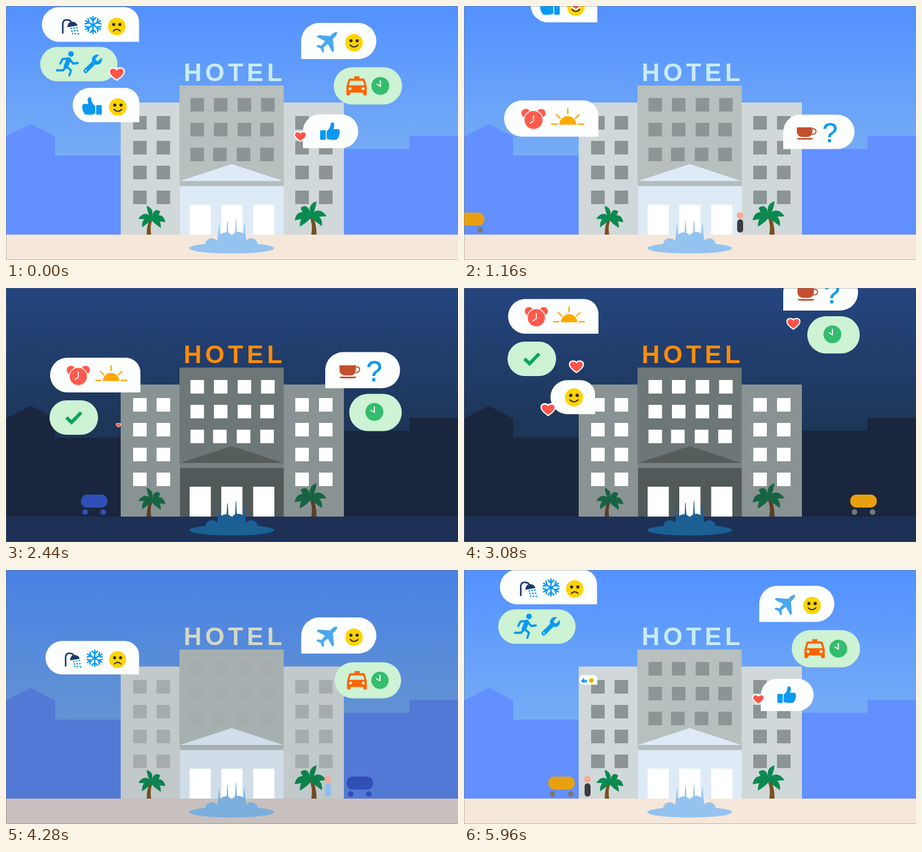
These frames come from a looping animation (800 by 450 pixels, 6 s). An HTML page:

```html
<!DOCTYPE html>
<html lang="en">
<head>
<meta charset="utf-8">
<title>Hotel messages</title>
<style>
html, body { margin: 0; width: 100%; height: 100%; overflow: hidden; background: #5291ff; }
svg { display: block; width: 100%; height: 100%; }
</style>
</head>
<body>
<svg id="stage" viewBox="0 0 800 450" xmlns="http://www.w3.org/2000/svg"></svg>
<script>
const LOOP = 6000, MOVE = 440;
const stage = document.getElementById('stage');
const BLUE = '#0a99f2', MINT = '#cdf2d4', WHITE = '#fdfefe';

function add(parent, tag, attrs = {}, html = '') {
  const el = document.createElementNS('http://www.w3.org/2000/svg', tag);
  for (const name in attrs) el.setAttribute(name, attrs[name]);
  if (html) el.innerHTML = html;
  parent.appendChild(el);
  return el;
}

const clamp = u => Math.min(1, Math.max(0, u));
const backOut = u => { const v = 1 - clamp(u); return 1 - 2.1 * v ** 3 + 1.1 * v ** 2; };

// Day and night colours; a higher power darkens later
const tints = [];
const rgb = hex => [1, 3, 5].map(i => parseInt(hex.slice(i, i + 2), 16));
function tinted(el, day, night, attr = 'fill', power = 1) {
  tints.push({ el, attr, power, day: rgb(day), night: rgb(night) });
  return el;
}
function scenery(tag, attrs, day, night, power) {
  return tinted(add(stage, tag, attrs), day, night, 'fill', power);
}
function box(x, y, width, height, day, night, power) {
  return scenery('rect', { x, y, width, height }, day, night, power);
}
function paintSky(night) {
  for (const c of tints) {
    const mix = c.day.map((v, i) => Math.round(v + (c.night[i] - v) * night ** c.power));
    c.el.setAttribute(c.attr, `rgb(${mix})`);
  }
}

const gradient = add(add(stage, 'defs'), 'linearGradient',
  { id: 'sky', gradientUnits: 'userSpaceOnUse', x1: 0, y1: 0, x2: 0, y2: 265 });
tinted(add(gradient, 'stop', { offset: 0 }), '#5291ff', '#24457f', 'stop-color');
tinted(add(gradient, 'stop', { offset: 1 }), '#76acf5', '#1d3555', 'stop-color');
add(stage, 'rect', { width: 800, height: 450, fill: 'url(#sky)' });
scenery('path', { d: 'M0 231L44 209L87 231V265H400V253H714V230H800V406H0Z' }, '#6390ff', '#1a263d');
box(0, 405, 800, 45, '#f5e7da', '#1d3157');

// Hotel
box(203, 171, 105, 234, '#d0d8d9', '#899393');
box(491, 171, 107, 234, '#d0d8d9', '#899393');
box(307, 141, 184.5, 170, '#b7bfbf', '#6e7777');
box(308, 310, 183.5, 9, '#b5bdbd', '#788181');
scenery('path', { d: 'M308 310L399.5 280L491 310Z' }, '#deebf7', '#555d5d', 1.5);
box(308, 319, 183.5, 86, '#deebf7', '#515959', 1.5);
const windowAt = (x, y) => box(x, y, 24, 24, '#8b9596', '#ffffff');
for (const x of [225, 266.5, 512, 554])
  for (let row = 0; row < 4; row++) windowAt(x, 195 + row * 44);
[[326.5, 368, 410, 451.5], [326.5, 368, 410, 450], [326.5, 366.5, 408.5, 450]]
  .forEach((xs, row) => xs.forEach(x => windowAt(x, 163 + row * 44)));
for (const x of [325, 381, 437.5])
  add(stage, 'rect', { x, y: 352, width: 37.5, height: 53, fill: '#fff' });
const sign = scenery('text', {
  x: 314.5, y: 133, 'font-size': 44, 'font-weight': 700, 'letter-spacing': 6.3,
  'font-family': '"Liberation Sans", Arial, sans-serif'
}, '#c8ecf5', '#ff8c0a');
sign.textContent = 'HOTEL';

// Palms
function palm(x, scaleX, scaleY) {
  const g = add(stage, 'g', { transform: `translate(${x} 405) scale(${scaleX} ${scaleY})` });
  tinted(add(g, 'path', { d: 'M-4 0Q-4 -18 3 -30L7 -28Q1 -16 4 0Z' }), '#7a4f1e', '#5c3d25');
  const leaves = [[-19, -28, -8, -44, -3, -27], [-12, -13, -14, -31, 1, -22], [-4, -51, 10, -46, -3, -38],
    [20, -41, 9, -49, 17, -30], [29, -22, 25, -41, 14, -24], [21, -12, 22, -30, 7, -21]];
  for (const [tx, ty, ax, ay, bx, by] of leaves)
    tinted(add(g, 'path', { d: `M5 -31Q${ax} ${ay} ${tx} ${ty}Q${bx} ${by} 5 -26Z` }), '#0a8a50', '#176443');
}
palm(253, 1, 1);
palm(545, -1.18, 1.16);

// Traffic
const CAR_SPEED = 0.92, WALK_SPEED = 0.5;
const movers = [];
function car(start, color, wheels) {
  const el = add(stage, 'g', {}, `<rect x="-23.5" y="366" width="47" height="23" rx="11" fill="${color}"/>
    <g fill="${wheels}"><circle cx="-16" cy="397" r="5"/><circle cx="16" cy="397" r="5"/></g>`);
  movers.push({ el, start, from: 824, speed: -CAR_SPEED });
}
function walker(start, color) {
  const el = add(stage, 'g', {}, `<circle cy="371" r="6" fill="#f9a898"/>
    <rect x="-5" y="378" width="10.5" height="23.5" rx="5" fill="${color}"/>`);
  movers.push({ el, start, from: -6, speed: WALK_SPEED });
}
for (const start of [279, 2954, 5253]) car(start, '#e8a010', '#777777');
for (const start of [1715, 4066]) car(start, '#3050b8', '#3050b8');
walker(172, '#3c3c40');
walker(3130, '#8fbff0');
walker(5512, '#3c3c40');

// Fountain
const WATER = ['#94c3f0', '#1a6095'];
scenery('ellipse', { cx: 399.5, cy: 429, rx: 75, ry: 9.5 }, ...WATER);
for (const [cx, cy, r] of [[364, 423, 11.5], [389, 414, 13], [411, 413, 13], [434, 423, 11.5]])
  scenery('circle', { cx, cy, r }, ...WATER);
box(364, 415, 70, 12, ...WATER);
const jets = [[377, 388], [392, 379], [407, 380], [422, 389]].map(([x, tip], i) =>
  ({ x, tip, phase: i * 1.7, el: scenery('path', {}, ...WATER) }));

// Icons, each around its own centre
const at = (x, y, html, extra = '') => `<g transform="translate(${x} ${y}) ${extra}">${html}</g>`;
const line = (d, color, width, cap = 'round', join = 'round') =>
  `<path d="${d}" fill="none" stroke="${color}" stroke-width="${width}" stroke-linecap="${cap}" stroke-linejoin="${join}"/>`;
const fill = (d, color) => `<path d="${d}" fill="${color}"/>`;
const dot = (x, y, r, color) => `<circle cx="${x}" cy="${y}" r="${r}" fill="${color}"/>`;

const face = mouth => dot(0, 0, 15.5, '#ffd400') + dot(-5.5, -3.5, 2.8, '#2b2b2b') + dot(5.5, -3.5, 2.8, '#2b2b2b') +
  line(mouth, '#2b2b2b', 2);
const smile = face('M-7 4Q0 11 7 4');
const sad = face('M-6 8Q0 2 6 8');
const thumb = '<rect x="-17.5" y="-2" width="10" height="17" rx="1.5" fill="#0a99f2"/>' +
  fill('M-6 0Q0 -5 1 -11Q1 -16 4 -16Q9 -15 7 -7L6 -4H14Q18 -3 17 1Q18 4 16 6Q17 9 14 11Q14 15 9 15H0L-6 13Z', BLUE);
let flake = '', drops = '';
for (let a = 0; a < 360; a += 60)
  flake += `<g transform="rotate(${a})">${line('M0 0V-15M-5 -13L0 -8L5 -13', BLUE, 2.6)}</g>`;
for (let row = 0; row < 3; row++)
  for (let col = 0; col < 3; col++) drops += dot(2 + col * 5 + row * 1.2, 3 + row * 4.5 - col * 0.8 + col * row * 0.6, 1.5, BLUE);
const shower = line('M-13 11V-6Q-12 -13 -5 -12Q0 -12 2 -8', '#1b3a6b', 2.8) +
  fill('M-5 1Q-4 -9 3 -9Q11 -9 13 -2Z', '#1b3a6b') + drops;
const runner = dot(6, -18, 5, BLUE) + line('M2 -8L-3 4', BLUE, 8) +
  line('M2 -10L-9 -9L-13 -1M4 -8L10 -1L18 -2M-1 5L6 11L3 20M-3 5L-8 11L-19 11', BLUE, 3.8);
const wrench = line('M-12 12L5 -5', BLUE, 7.5) + dot(8, -8, 9, BLUE) + line('M9 -9L18 -18', MINT, 6.5) +
  dot(-11.5, 11.5, 1.6, MINT);
const clock = dot(0, 0, 15.8, '#33bd6c') + line('M0 1V-9M0 1L-6 -3', '#fff', 2);
const alarm = dot(-13, -11, 7.5, '#ff5a4d') + dot(13, -11, 7.5, '#ff5a4d') +
  `<circle cy=".5" r="16" fill="#ff5a4d" stroke="${WHITE}" stroke-width="1.5"/>` + line('M0 -7V2L-6 6', '#fff', 1.8);
const sun = fill('M-14.5 0A14.5 14.5 0 0 1 14.5 0Z', '#ffa900') +
  line('M-27 -1H-18M18 -1H27M-19 -17L-13 -11M19 -17L13 -11M0 -27V-19', '#ffa900', 2.4);
const plane = fill('M0 -23C4 -20 3.5 -14 3.5 -9L20 5V9L3.5 4L2.5 14L8 18V22L0 19L-8 22V18L-2.5 14L-3.5 4L-20 9V5L-3.5 -9C-3.5 -14 -4 -20 0 -23Z', '#4aa8f0');
const taxi = fill('M-4 -17H5V-13H12Q14 -13 15 -9L18 1V14Q18 17 15 17Q11 17 11 12H-11Q-11 17 -15 17Q-18 17 -18 14V1L-15 -9Q-14 -13 -12 -13H-4Z', '#ff6400') +
  fill('M-11 -9H11L14 -1H-14Z', MINT) + dot(-11.5, 5, 2.6, MINT) + dot(11.5, 5, 2.6, MINT);
const cup = fill('M-18 -10H11V-1Q9 8 2 8H-9Q-17 7 -18 -1ZM-18 10H12Q11 13 8 13H-14Q-17 13 -18 10Z', '#c4502f') +
  line('M11 -7H14Q18 -6 17.5 -2Q17 3 10 3', '#c4502f', 2);
const question = `<text y="18" text-anchor="middle" font-size="50" fill="${BLUE}" stroke="${BLUE}" stroke-width=".7"
  font-family="'Liberation Sans', Arial, sans-serif">?</text>`;
const check = line('M-13 0L-4 8.5L13 -9', '#0aa35c', 6, 'butt', 'miter');
const heart = size => at(0, 0, `<path d="M0 10C-9 4 -12 0 -12 -4C-12 -10 -3 -11 0 -5.5C3 -11 12 -10 12 -4C12 0 9 4 0 10Z"
  fill="#ff5448" stroke="#fff" stroke-width="5" stroke-linejoin="round" paint-order="stroke"/>`, `scale(${size})`);

// Bubbles: the tail side is 1 for a sharp right corner, -1 for left, 0 for a pill
function bubble(width, height, tail, icons) {
  const w = width / 2, h = height / 2;
  if (!tail) return `<rect x="${-w}" y="${-h}" width="${width}" height="${height}" rx="${h}" fill="${MINT}"/>` + icons;
  const top = tail > 0 ? h * 0.85 : h;
  const shape = fill(`M${w} ${h}V${top - h}A${top} ${top} 0 0 0 ${w - top} ${-h}H${h - w}A${h} ${h} 0 0 0 ${h - w} ${h}Z`, WHITE);
  return at(-tail * w, -h, (tail > 0 ? shape : `<g transform="scale(-1 1)">${shape}</g>`) + icons);
}

// Each column scrolls by [start, distance]; late columns run on past the loop point
const WRAP = LOOP + 500;
const columns = [
  { late: false, shifts: [[1440, -46.5], [2560, -104], [3640, -240]], items: [
    [880, 238, 231.5, bubble(160, 61.5, 1, at(-30, 2, alarm) + at(28, 10.5, sun))],
    [1690, 120, 276, bubble(86, 61, 0, at(0, 0, check))],
    [2760, 232, 374, bubble(76, 58, 1, at(2, 0.5, smile))],
    [2400, 199, 289.5, heart(0.93)],
    [2860, 149, 365.5, heart(0.93)]] },
  { late: true, shifts: [[4640, -51], [5640, -70.5], [WRAP + 700, -177], [WRAP + 1440, -46.5]], items: [
    [4095, 235.5, 185, bubble(172, 61.5, 1, at(-36, 4, shower) + at(4.5, 1, flake) + at(46.5, 3.5, sad))],
    [5080, 129, 224.5, bubble(137, 61, 0, at(-20, 0, runner) + at(24, 0, wrench))],
    [5928, 236, 327.5, bubble(118, 61, 1, at(-25, 2, thumb, 'scale(-1 1)') + at(21, 3.5, smile))],
    [6000, 196, 241.5, heart(1)],
    [WRAP + 500, 198, 294.5, heart(0.93)]] },
  { late: false, shifts: [[1440, -76], [2560, -137.5], [3240, -160]], items: [
    [980, 565, 253.5, bubble(132.5, 64, -1, at(-23, 1.5, cup) + at(20.5, 1, question))],
    [1861, 654, 296.5, bubble(93, 66, 0, at(-2, -1, clock))],
    [2780, 583, 276.5, heart(0.83)]] },
  { late: true, shifts: [[3840, -60], [5640, -54], [WRAP + 680, -290]], items: [
    [3500, 522.5, 208, bubble(133, 64, -1, at(-19, 0, plane, 'rotate(45) scale(.98)') + at(27, 3, smile))],
    [4090, 640.5, 255.5, bubble(121, 66, 0, at(-20, 0, taxi) + at(22, 0, clock))],
    [5780, 525.5, 366, bubble(98, 60, -1, at(-1, 0, thumb))],
    [5780, 521, 345, heart(0.79)]] }
];
for (const col of columns)
  col.items = col.items.map(([birth, x, y, html]) => ({ birth, x, y, el: add(stage, 'g', {}, html) }));

add(stage, 'path', { d: 'M0.5 450V0.5H800M0 449.5H800', fill: 'none', stroke: '#707070', opacity: 0.45 });

function draw(t) {
  paintSky(t < 3000 ? clamp((t - 1520) / 560) : 1 - clamp((t - 3840) / 560));

  for (const m of movers) {
    const x = m.from + m.speed * (t - m.start);
    const seen = t >= m.start && x > -30 && x < 830;
    m.el.setAttribute('display', seen ? 'inline' : 'none');
    m.el.setAttribute('transform', `translate(${x} 0)`);
  }

  for (const j of jets) {
    const tip = j.tip + 3 * Math.sin(t / LOOP * 20 * Math.PI + j.phase);
    j.el.setAttribute('d', `M${j.x - 4} 420Q${j.x - 1} 402 ${j.x - 0.5} ${tip}H${j.x + 0.5}Q${j.x + 1} 402 ${j.x + 4} 420Z`);
  }

  for (const col of columns) {
    const time = col.late && t < 3000 ? t + WRAP : t;
    const scroll = col.shifts.reduce((sum, [start, dy]) => sum + dy * backOut((time - start) / MOVE), 0);
    for (const item of col.items) {
      const size = Math.max(0, backOut((time - item.birth) / MOVE));
      item.el.setAttribute('display', size > 0.001 ? 'inline' : 'none');
      item.el.setAttribute('transform', `translate(${item.x} ${item.y + scroll}) scale(${size})`);
    }
  }
}

const began = performance.now();
function tick() {
  draw((performance.now() - began) % LOOP);
  requestAnimationFrame(tick);
}
draw(0);
requestAnimationFrame(tick);
</script>
</body>
</html>
```
